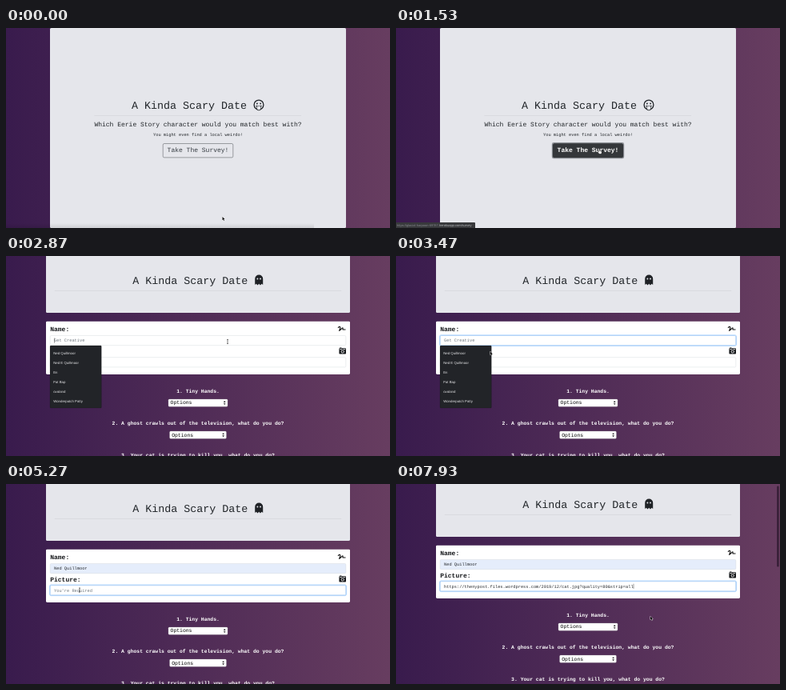
An HTML page with a canvas for the animation above (8 s loop, 480x250 px).

```html
<!DOCTYPE html>
<html lang="en">
<head>
<meta charset="utf-8">
<title>A Kinda Scary Date</title>
<style>
  html, body { margin: 0; width: 100%; height: 100%; overflow: hidden; background: #4d2d5a; }
  canvas { display: block; width: 480px; height: 250px; }
</style>
</head>
<body>
<canvas id="stage"></canvas>
<script>
const W = 480, H = 250, LOOP = 8000, STEP = 1000 / 15;
const MONO = '"Courier New", "Liberation Mono", monospace';
const SANS = '"Liberation Sans", Arial, sans-serif';
const INK = '#212529', PANEL = '#e5e6eb', BORDER = '#ced4da';
const PERSON = 'Ned Quillmoor';
const PHOTO_URL = 'https://thenypost.files.wordpress.com/2019/12/cat.jpg?quality=80&strip=all';
const SUGGESTIONS = [PERSON, 'Ned E Quillmoor', 'En', 'Fat Bap', 'ovaland', 'Wonderpatch Patty'];

// Moments at which the page reacts, in ms.
const LINK_HOVER = 1320, NEXT_PAGE = 1660, NAME_FOCUS = 2920, POPUP_OPEN = 2790,
  PREVIEW = 3520, PICK = 4190, PIC_FOCUS = 4720, PASTE = 5790, SCROLL = 7740;

// Pointer stops: time, x, y.
const POINTER = [
  [0, 270.5, 236], [0, 270.5, 236], [266, 295.5, 211], [400, 295.5, 211],
  [1266, 253.7, 152], [2066, 253.7, 152], [2790, 277, 107], [2930, 277, 107],
  [3667, 82.5, 122], [3800, 82.5, 122], [4000, 84, 124], [4250, 84, 124],
  [4720, 92, 132.5], [5600, 92, 132.5], [6467, 221.5, 194], [6600, 222, 194.5],
  [6867, 222, 194.5], [7133, 318, 165.5]
];

const canvas = document.getElementById('stage');
const ctx = canvas.getContext('2d');
const dpr = window.devicePixelRatio || 1;
canvas.width = W * dpr;
canvas.height = H * dpr;

const clamp = v => Math.max(0, Math.min(1, v));
const ramp = (t, from, length) => clamp((t - from) / length);
const smooth = v => v * v * (3 - 2 * v);
const blinkOn = (t, start) => Math.floor((t - start) / 530) % 2 === 0;

function box(x, y, w, h, r, fill, stroke, line = 0.4) {
  ctx.beginPath();
  ctx.roundRect(x, y, w, h, r);
  if (fill) { ctx.fillStyle = fill; ctx.fill(); }
  if (stroke) { ctx.strokeStyle = stroke; ctx.lineWidth = line; ctx.stroke(); }
}

function text(str, x, y, size, { color = INK, weight = 400, align = 'left', font = MONO } = {}) {
  ctx.font = `${weight} ${size}px ${font}`;
  ctx.textRendering = 'geometricPrecision';
  ctx.textAlign = align;
  ctx.fillStyle = color;
  ctx.fillText(str, x, y);
}

function shape(path, fill, stroke, line = 1) {
  const p = new Path2D(path);
  if (stroke) { ctx.strokeStyle = stroke; ctx.lineWidth = line; ctx.stroke(p); }
  if (fill) { ctx.fillStyle = fill; ctx.fill(p); }
}

function at(x, y, draw) {
  ctx.save();
  ctx.translate(x, y);
  draw();
  ctx.restore();
}

function dot(x, y, r, color) {
  ctx.beginPath();
  ctx.arc(x, y, r, 0, 7);
  ctx.fillStyle = color;
  ctx.fill();
}

function background() {
  const g = ctx.createLinearGradient(0, 0, W, 0);
  g.addColorStop(0, '#391b4d');
  g.addColorStop(1, '#673d60');
  ctx.fillStyle = g;
  ctx.fillRect(0, 0, W, H);
}

function grin() {
  ctx.beginPath();
  ctx.arc(0, 0, 5.9, 0, 7);
  ctx.strokeStyle = INK;
  ctx.lineWidth = 1.3;
  ctx.stroke();
  dot(-2.1, -1.5, 0.9, INK);
  dot(2.1, -1.5, 0.9, INK);
  shape('M-3.5 1.2Q0 3 3.5 1.2', null, INK, 1.1);
  shape('M-2.1 2V4.5A2.1 2.1 0 0 0 2.1 4.5V2', PANEL, INK, 1.1);
}

function ghost() {
  shape('M-5 6V-1.5A5 5 0 0 1 5 -1.5V6L3.4 4.8L1.7 6.4L0 4.8L-1.7 6.4L-3.4 4.8Z', '#1f2226');
  dot(-1.8, -1.5, 0.95, PANEL);
  dot(1.8, -1.5, 0.95, PANEL);
}

function signature() {
  shape('M-4.6 -1.3C-3.5 -3.4 -1.4 -3.2 -2 -1L-3 2.1C-1 1.6 0 -1.8 1.2 -1.4C2 -1 .6 1 1.8 .8H4.8',
    null, '#111', 1.15);
}

function camera() {
  box(-4.3, -3.2, 8.6, 7.2, 0.8, '#16181b');
  box(-3.6, -4, 2.4, 1, 0.2, '#16181b');
  ctx.fillStyle = '#fff';
  ctx.fillRect(-3.5, -2.2, 3, 0.8);
  ctx.fillRect(0.6, -2.2, 2.9, 0.8);
  dot(0, 1, 2, '#fff');
  dot(0, 1, 1.3, '#16181b');
}

function rule(x, y, w) {
  ctx.fillStyle = 'rgba(0,0,0,.1)';
  ctx.fillRect(x, y, w, 0.5);
}

function surveyButton(hover, pressed) {
  if (pressed) box(195.4, 143.7, 89.2, 19, 1.8, null, 'rgba(52,58,64,.5)', 1.2);
  box(196.2, 144.5, 87.6, 17.4, 1.6, null, '#4a4e53', 0.5);
  ctx.globalAlpha = hover;
  box(196, 144.3, 88, 17.8, 1.6, '#34373a');
  ctx.globalAlpha = 1;
  const lit = hover > 0.5;
  text('Take The Survey!', 240, 155, 8,
    { align: 'center', color: lit ? '#fff' : '#343a40', weight: lit ? 700 : 400 });
}

function statusBar() {
  box(-2, 243, 101, 9, 1, '#38393c');
  text('https://glacial-harpoon-69787', 1, 247.8, 4, { font: SANS, color: '#85888c' });
  const x = 1 + ctx.measureText('https://glacial-harpoon-69787').width;
  text('.herokuapp.com/survey', x, 247.8, 4, { font: SANS, color: '#b4b7ba' });
}

function landing(t) {
  box(55, 0, 370, 250, 1.6, PANEL);
  text('A Kinda Scary Date', 157, 101, 13.333);
  at(316, 96, grin);
  rule(110.5, 109.3, 258.5);
  text('Which Eerie Story character would you match best with?', 240, 122.5, 8, { align: 'center' });
  text('You might even find a local weirdo!', 240, 134.8, 5.333, { align: 'center' });
  surveyButton(ramp(t, 960, 150), t >= 1450);
  if (t < LINK_HOVER) {
    const g = ctx.createLinearGradient(0, 244, 0, 250);
    g.addColorStop(0, 'rgba(0,0,0,0)');
    g.addColorStop(1, 'rgba(0,0,0,.1)');
    ctx.fillStyle = g;
    ctx.fillRect(0, 244, 385, 6);
  } else {
    statusBar();
  }
}

function field(y, { value, hint, focus, filled, caret }) {
  if (focus > 0) {
    ctx.globalAlpha = focus;
    box(54.5, y - 0.5, 371, 13.6, 1.8, null, 'rgba(0,123,255,.28)', 1);
    ctx.globalAlpha = 1;
  }
  box(55.2, y + 0.2, 369.6, 12.2, 1.3, filled ? '#e5edfb' : '#fff', BORDER);
  if (focus > 0) {
    ctx.globalAlpha = focus;
    box(55.2, y + 0.2, 369.6, 12.2, 1.3, null, '#80bdff', 0.5);
    ctx.globalAlpha = 1;
  }
  text(value || hint, 60, y + 8, 5.333, { color: value ? '#24282c' : '#6c757d' });
  if (caret != null) {
    ctx.fillStyle = '#111';
    ctx.fillRect(60 + caret * 3.2, y + 3.2, 0.4, 6.2);
  }
}

function question(str, y, selectX, selectW) {
  text(str, 240, y, 6.4, { weight: 700, align: 'center', color: '#fff' });
  if (!selectW) return;
  box(selectX, y + 8.5, selectW, 9.2, 1.3, '#fff', '#bbb', 0.3);
  text('Options', selectX + 2.6, y + 14.9, 6.4, { color: '#000' });
  at(selectX + selectW - 3.8, y + 13.1, () =>
    shape('M-1.4 -.6L0 -2.5L1.4 -.6ZM-1.4 .6L0 2.5L1.4 .6Z', '#222'));
}

function popup(t) {
  box(55, 112, 64.3, 78, 1, '#222428', 'rgba(0,0,0,.35)', 0.4);
  if (t >= PREVIEW) {
    ctx.fillStyle = '#3c3f43';
    ctx.fillRect(55, 115, 64.3, 12);
  }
  SUGGESTIONS.forEach((name, i) =>
    text(name, 59.2, 122.6 + i * 12, 4.333, { font: SANS, color: '#e4e5e7' }));
}

function survey(t) {
  const scroll = 5 * ramp(t, SCROLL, 180);
  const open = t >= POPUP_OPEN && t < PICK;
  const picked = t >= PREVIEW;
  const pasted = t >= PASTE;

  ctx.save();
  ctx.translate(0, -scroll);
  box(50, -10, 380, 81, 1.6, PANEL);
  text('A Kinda Scary Date', 158.3, 35, 13.333);
  at(316.2, 30, ghost);
  rule(60.7, 43.3, 358.6);

  box(50, 81.7, 380, 66.3, 1.4, '#fff');
  text('Name:', 55.2, 94.4, 8, { weight: 700, color: '#16181b' });
  at(419.7, 91.2, signature);
  text('Picture:', 55.2, 121.7, 8, { weight: 700, color: '#16181b' });
  at(420.7, 118.5, camera);

  let nameCaret = null;
  if (open && blinkOn(t, POPUP_OPEN)) nameCaret = 0;
  else if (t >= PICK && t < PIC_FOCUS) nameCaret = PERSON.length;
  field(99.3, {
    value: picked ? PERSON : '', hint: 'Get Creative', filled: picked,
    focus: ramp(t, NAME_FOCUS, 150) * (1 - ramp(t, PIC_FOCUS, 150)), caret: nameCaret
  });

  let picCaret = null;
  if (pasted) picCaret = blinkOn(t, PASTE) ? PHOTO_URL.length : null;
  else if (t >= PIC_FOCUS && blinkOn(t, PIC_FOCUS)) picCaret = 0;
  field(126.5, {
    value: pasted ? PHOTO_URL : '', hint: "You're Required",
    focus: ramp(t, PIC_FOCUS, 150), caret: picCaret
  });

  question('1. Tiny Hands.', 170.5, 203, 74);
  question('2. A ghost crawls out of the television, what do you do?', 210.6, 204.6, 70.8);
  question('3. Your cat is trying to kill you, what do you do?', 250.5);
  if (open) popup(t);
  ctx.restore();

  if (scroll > 0) box(476.2, 1.5 + scroll * 0.2, 2.4, 101, 1.2, 'rgba(20,10,25,.6)');
}

function pointerAt(t) {
  let i = POINTER.length - 1;
  while (POINTER[i][0] > t) i--;
  const [t0, x0, y0] = POINTER[i];
  const [t1, x1, y1] = POINTER[i + 1] || [LOOP, x0, y0];
  const k = smooth(clamp((t - t0) / (t1 - t0)));
  return [x0 + (x1 - x0) * k, y0 + (y1 - y0) * k];
}

function pointer(t) {
  const [x, y] = pointerAt(t);
  const overButton = t < NEXT_PAGE && x > 196 && x < 284 && y > 144 && y < 162;
  const overName = y > 99 && y < 112;
  const overPicture = y > 126.5 && y < 139.5 && t > PICK;
  at(x, y, () => {
    if (overButton || (t >= NEXT_PAGE && t < 2120)) {
      shape('M0 .3Q.5 -.2 .9 .4V2L3 2.4Q3.5 2.7 3.3 3.4L2.8 5.2H.4L-1.1 3.4Q-1.2 2.6 -.4 2.8L0 3.1Z',
        '#fff', '#111', 0.7);
    } else if (t >= NEXT_PAGE && (overName || overPicture)) {
      shape('M-1 -2.7Q0 -2.7 0 -2Q0 -2.7 1 -2.7M0 -2V2M-1 2.7Q0 2.7 0 2Q0 2.7 1 2.7', null, '#222', 0.6);
    } else {
      shape('M0 0V4.3L1 3.4L1.7 5L2.4 4.7L1.7 3.1H3.1Z', '#111', '#fff', 0.7);
    }
  });
}

function frame(now) {
  const t = Math.floor((now % LOOP + 5) / STEP) * STEP % LOOP;
  ctx.setTransform(dpr, 0, 0, dpr, 0, 0);
  background();
  (t < NEXT_PAGE ? landing : survey)(t);
  pointer(t);
}

let start = null;
function tick(now) {
  if (start === null) start = now;
  frame(now - start);
  requestAnimationFrame(tick);
}
frame(0);
requestAnimationFrame(tick);
</script>
</body>
</html>
```
